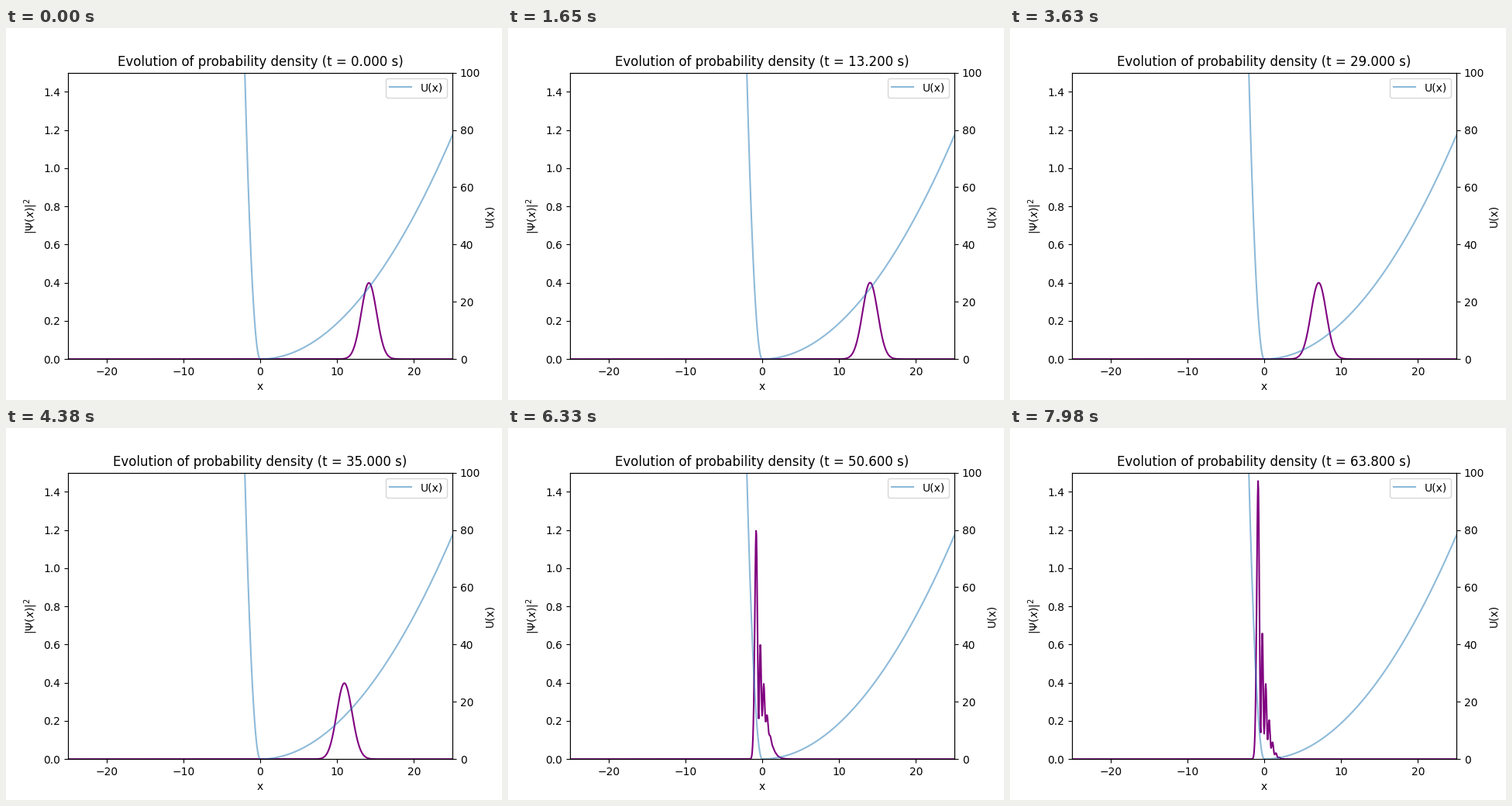
A matplotlib script that plays this animation: 640 px wide and 480 px high, repeating every 8 s.

```python
import numpy as np
import matplotlib.pyplot as plt
from matplotlib.animation import FuncAnimation

FRAMES = 320
INTERVAL = 25        # ms
DT = 0.2             # simulated seconds per frame
K_LEFT, K_RIGHT = 50.0, 0.25
X0 = np.sqrt(200)    # start of the packet, where U = 25
SIGMA = 1.0


def potential(x):
    return 0.5 * np.where(x < 0, K_LEFT, K_RIGHT) * x**2


def eigenstates(x):
    """Solve the stationary problem on a sinc grid (hbar = m = 1)."""
    dx = x[1] - x[0]
    i = np.arange(len(x))
    d = i[:, None] - i[None, :]
    sign = np.where(d % 2 == 0, 1.0, -1.0)
    kinetic = np.where(d == 0, np.pi**2 / 6, sign / np.where(d == 0, 1, d)**2)
    return np.linalg.eigh(kinetic / dx**2 + np.diag(potential(x)))


def densities(x, times):
    energy, states = eigenstates(x)
    psi = np.exp(-(x - X0)**2 / (4 * SIGMA**2)) / (2 * np.pi * SIGMA**2)**0.25
    coef = states.T @ psi
    keep = np.abs(coef) > 1e-9
    energy, coef, states = energy[keep], coef[keep], states[:, keep]
    phase = np.outer(energy, times)
    real = states @ (coef[:, None] * np.cos(phase))
    imag = states @ (coef[:, None] * np.sin(phase))
    return (real**2 + imag**2).T


x = np.linspace(-25, 25, 1001)
times = DT * np.arange(FRAMES)
density = densities(x, times)

fig, ax = plt.subplots(figsize=(6.4, 4.8), dpi=100)
ax.set_xlim(-25, 25)
ax.set_ylim(0, 1.5)
ax.set_xlabel("x")
ax.set_ylabel(r"$|\Psi(x)|^2$")
line, = ax.plot(x, density[0], color="purple")
title = ax.set_title("")

ax_u = ax.twinx()
ax_u.plot(x, potential(x), alpha=0.5, label="U(x)")
ax_u.set_ylim(0, 100)
ax_u.set_ylabel("U(x)")
ax_u.legend(loc="upper right")


def update(n):
    line.set_ydata(density[n])
    title.set_text(f"Evolution of probability density (t = {times[n]:.3f} s)")
    return line, title


anim = FuncAnimation(fig, update, frames=FRAMES, interval=INTERVAL,
                     repeat=True, repeat_delay=0, blit=False)
plt.show()
```
